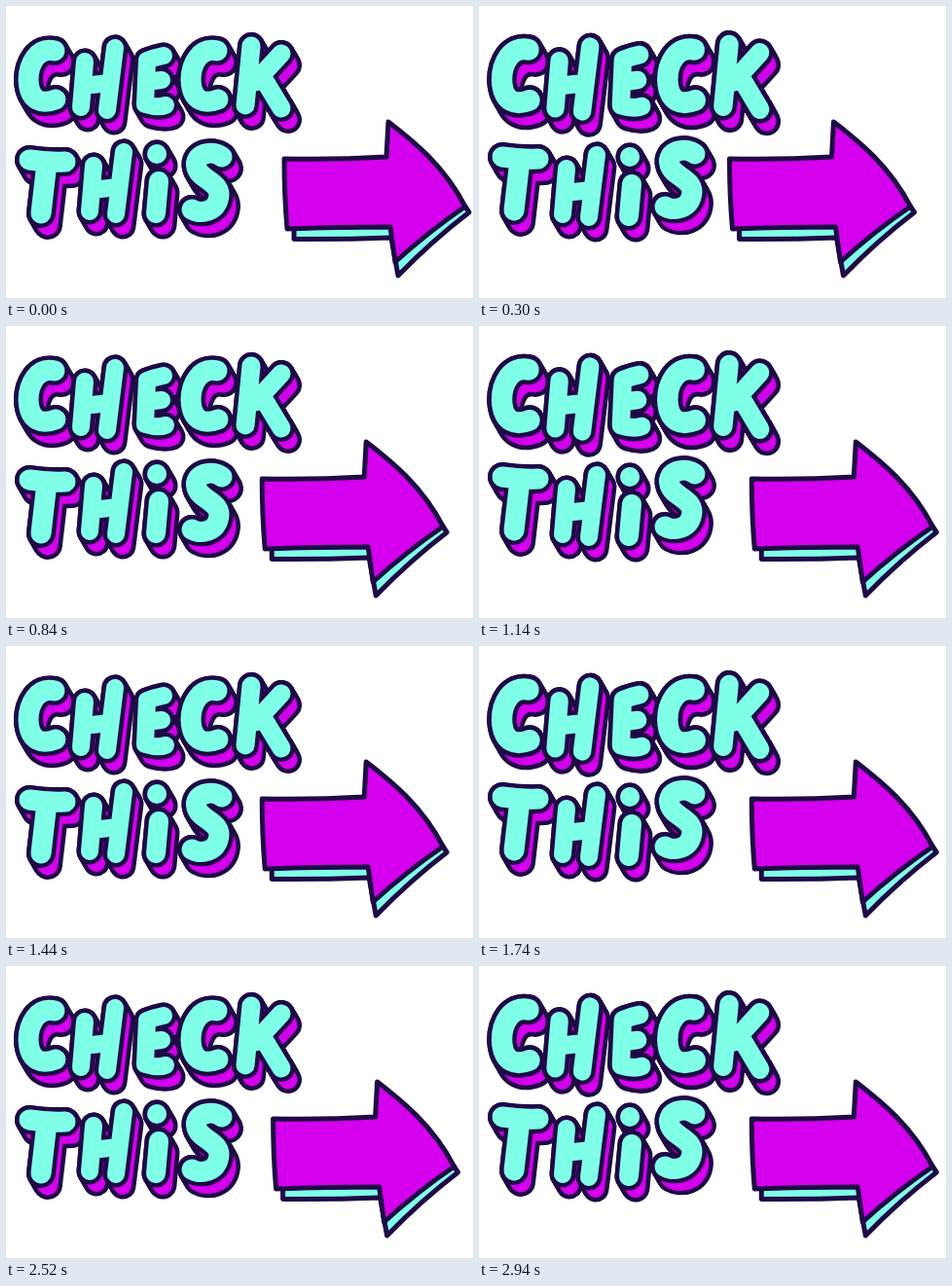
These frames come from a looping animation (480 by 300 pixels, 2.97 s). An HTML page with a canvas:

```html
<!DOCTYPE html>
<html>
<head>
<meta charset="utf-8">
<style>
html, body { margin: 0; width: 100%; height: 100%; overflow: hidden; background: #fff; }
canvas { display: block; }
</style>
</head>
<body>
<canvas id="stage" width="480" height="300"></canvas>
<script>
const ctx = document.getElementById('stage').getContext('2d');
const INK = '#1f0a45', MINT = '#80ffe8', PINK = '#d400ee';
const EDGE = 4.5, DEPTH = 12, STEP = 30, FRAMES = 99, HOLD = 10;

// Brush strokes around each letter's center
const glyph = (width, d) => ({ width, path: new Path2D(d) });
const glyphs = {
  C: glyph(21, 'M14 -30C-4 -34 -13 -16 -13 0C-12 23 2 25 15 20'),
  H: glyph(18, 'M-13 -19L-17 28M18 -33L10 31M-15 6L13 3'),
  E: glyph(18, 'M10 -25Q0 -23 -7 -20L-9 25Q4 29 12 26M-8 2L8 0'),
  K: glyph(19, 'M-14 -35L-20 26M17 -27L-10 2M-3 -4L17 29'),
  T: glyph(21, 'M-18 -25Q2 -22 19 -23M0 -22L-6 30'),
  i: glyph(20, 'M0 -31h.1M2 -3L-1 30'),
  S: glyph(21, 'M15 -28C5 -36 -15 -31 -11 -17C-8 -5 12 -3 12 11C11 29 -7 31 -16 26')
};
const rows = [
  { text: 'CHECK', y: 76, xs: [36, 94, 152, 203, 266] },
  { text: 'THiS', y: 183, xs: [42, 103, 155, 207] }
];

const arrowFront = new Path2D('M286 157Q340 158 391 155L393 119C420 140 450 164 472 206Q434 232 400 263L395 227Q344 227 289 229Q286 195 286 157Z');
const arrowSide = new Path2D('M296 228L296 239.5Q346 240 396 238L403 277Q438 241 476 212L472 206L395 226Z');

function paint({ width, path }, color, edge, offset = 0) {
  ctx.save();
  ctx.translate(offset * .58, offset);
  ctx.strokeStyle = color;
  ctx.lineWidth = width + edge * 2;
  ctx.stroke(path);
  ctx.restore();
}

function drawShadow(g) {
  for (const [color, edge] of [[INK, EDGE], [PINK, 0]])
    for (let d = 0; d <= DEPTH; d++) paint(g, color, edge, d);
}

function drawFace(g) {
  paint(g, INK, EDGE);
  paint(g, MINT, 0);
}

// The second pose swells the top row and bobs the letters of the bottom row.
function eachLetter(moved, render) {
  rows.forEach(({ text, y, xs }, row) => [...text].forEach((char, i) => {
    ctx.save();
    if (moved && row === 0) {
      ctx.translate(0, -3);
      ctx.scale(1.02, 1.04);
    } else if (moved) {
      ctx.translate(0, 1 - 4 * Math.cos(i * Math.PI * 2 / 3));
    }
    ctx.translate(xs[i], y);
    render(glyphs[char]);
    ctx.restore();
  }));
}

function drawArrow(x) {
  ctx.save();
  ctx.translate(x, 0);
  ctx.strokeStyle = INK;
  ctx.lineWidth = 5;
  for (const [path, color] of [[arrowSide, MINT], [arrowFront, PINK]]) {
    ctx.fillStyle = color;
    ctx.fill(path);
    ctx.stroke(path);
  }
  ctx.restore();
}

function draw() {
  const n = Math.floor(performance.now() / STEP) % FRAMES;
  const moved = Math.floor(n / HOLD) % 2 === 1;
  const swing = 1 - Math.abs(n % (2 * HOLD) / HOLD - 1);
  ctx.fillStyle = '#fff';
  ctx.fillRect(0, 0, 480, 300);
  ctx.lineCap = ctx.lineJoin = 'round';
  eachLetter(moved, drawShadow);
  eachLetter(moved, drawFace);
  drawArrow(-28.5 * swing);
  requestAnimationFrame(draw);
}
draw();
</script>
</body>
</html>
```
